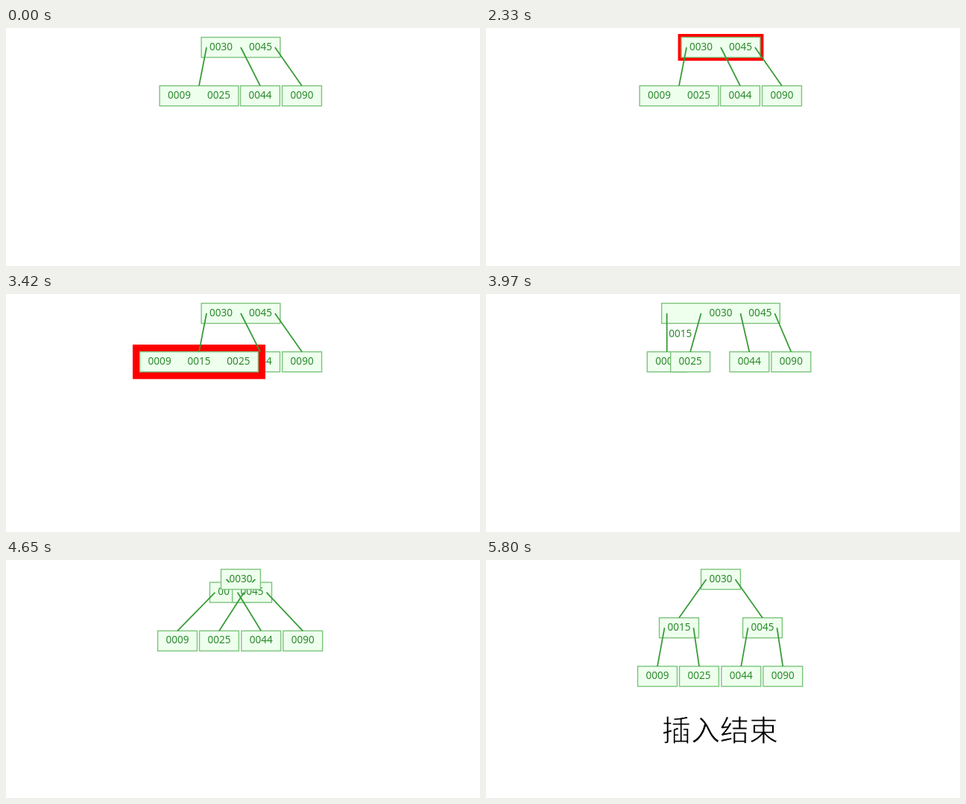
These frames come from a looping animation (636 px wide and 320 px high, 7340 ms). An HTML page with a canvas:

```html
<!DOCTYPE html>
<html lang="zh-CN">
<head>
<meta charset="utf-8">
<style>
html, body { margin: 0; width: 100%; height: 100%; overflow: hidden; background: #fff; }
canvas { display: block; }
</style>
</head>
<body>
<canvas id="stage" width="636" height="320"></canvas>
<script>
const ctx = document.getElementById('stage').getContext('2d');
const LOOP = 7340, MOVE = 290;
const KEY_W = 52.9, NODE_H = 27, ROW = 65.2, TOP = 26, MID = 315;

// Start times: visit root, follow edge, visit leaf, overflow, split leaf, visit root, split root
const STAGES = [2330, 2620, 3005, 3419, 3803, 4186, 4569];

const lerp = (a, b, p) => a + (b - a) * p;
const rowY = r => TOP + ROW * r;
const node = (x, row, keys, kids = [], hot = false) => ({ x, y: rowY(row), keys, kids, hot });

function tree(stage, p) {
  if (stage < 4) {
    const shift = stage === 3 ? 26.5 * p : 0;
    const keys = stage === 3 ? ['0009', '0015', '0025'] : ['0009', '0025'];
    const leaves = [
      node(259, 1, keys, [], stage === 2 || stage === 3),
      node(341 + shift, 1, ['0044']),
      node(397 + shift, 1, ['0090'])
    ];
    return [...leaves, node(MID, 0, ['0030', '0045'], leaves, stage === 0 || stage === 1)];
  }
  const spread = stage === 4 ? p : 1;
  const drop = stage === 6 ? p : 0;
  const leaf = (key, from, to) => node(lerp(from, to, spread), 1 + drop, [key]);
  const leaves = [
    leaf('0009', 259, 230), leaf('0025', 259, 286),
    leaf('0044', 367.5, 342.3), leaf('0090', 423.5, 398.3)
  ];
  if (stage < 6) {
    const first = stage === 4 ? '' : '0015';
    return [...leaves, node(MID, 0, [first, '0030', '0045'], leaves, stage === 5)];
  }
  const left = node(MID - 56 * p, drop, ['0015'], leaves.slice(0, 2));
  const right = node(MID + 56 * p, drop, ['0045'], leaves.slice(2));
  return [...leaves, left, right, node(MID, 0, ['0030'], [left, right])];
}

function drawKey(text, x, y) {
  ctx.font = '13.6px "Noto Sans", "Open Sans", sans-serif';
  ctx.fillStyle = '#2b8a2b';
  ctx.fillText(text, x, y + 3.6);
}

function drawNode({ x, y, keys, hot }, glow) {
  const w = KEY_W * keys.length, left = x - w / 2, top = y - NODE_H / 2;
  if (hot) {
    ctx.fillStyle = '#f00';
    ctx.fillRect(left - glow, top - glow, w + 2 * glow, NODE_H + 2 * glow);
  }
  ctx.fillStyle = '#eeffee';
  ctx.fillRect(left, top, w, NODE_H);
  ctx.strokeStyle = '#7cc47c';
  ctx.lineWidth = 1.4;
  ctx.strokeRect(left, top, w, NODE_H);
  keys.forEach((key, i) => drawKey(key, left + KEY_W * (i + 0.5), y));
}

function drawEdges({ x, y, keys, kids }, lit) {
  const n = keys.length, left = x - KEY_W * n / 2;
  kids.forEach((kid, i) => {
    const inset = i === 0 ? 7 : i === n ? -7 : 0;
    ctx.beginPath();
    ctx.moveTo(left + KEY_W * i + inset, y);
    ctx.lineTo(kid.x, kid.y - NODE_H / 2);
    if (lit && i === 0) {
      ctx.strokeStyle = '#f00';
      ctx.lineWidth = 5.5;
      ctx.stroke();
    }
    ctx.strokeStyle = '#3a9c3a';
    ctx.lineWidth = 1.8;
    ctx.stroke();
  });
}

function caption(text, x, y) {
  ctx.font = '39px "Noto Sans CJK SC", "Noto Sans CJK", sans-serif';
  ctx.fillStyle = '#000';
  ctx.fillText(text, x, y);
  // A white outline thins the strokes to a light weight
  ctx.strokeStyle = '#fff';
  ctx.lineWidth = 0.8;
  ctx.strokeText(text, x, y);
}

function draw(t) {
  // The tree advances in discrete ticks
  const tick = Math.min(38, Math.floor((t - 2321) / 68));
  const time = 2330 + 68.15 * tick;
  const stage = STAGES.filter(s => s <= time).length - 1;
  const p = stage < 0 ? 0 : Math.min(1, (time - STAGES[stage]) / MOVE);
  const glow = 4 + Math.abs(6.2 - Math.abs(time - 3330) * 0.0057);

  ctx.fillStyle = '#fff';
  ctx.fillRect(0, 0, 636, 320);
  ctx.textAlign = 'center';

  const nodes = tree(stage, p);
  nodes.sort((a, b) => a.hot - b.hot).forEach(n => drawNode(n, glow));
  nodes.forEach(n => drawEdges(n, stage === 1));
  if (stage === 4) drawKey('0015', lerp(259, 262, p), lerp(rowY(1), rowY(0), p));

  if (t >= 70 && t < 990) caption('插入元素15', 317.5, 174.5);
  if (t >= 5800) caption('插入结束', 314, 243);
}

const start = performance.now();
function frame() {
  draw((performance.now() - start) % LOOP);
  requestAnimationFrame(frame);
}
frame();
</script>
</body>
</html>
```
